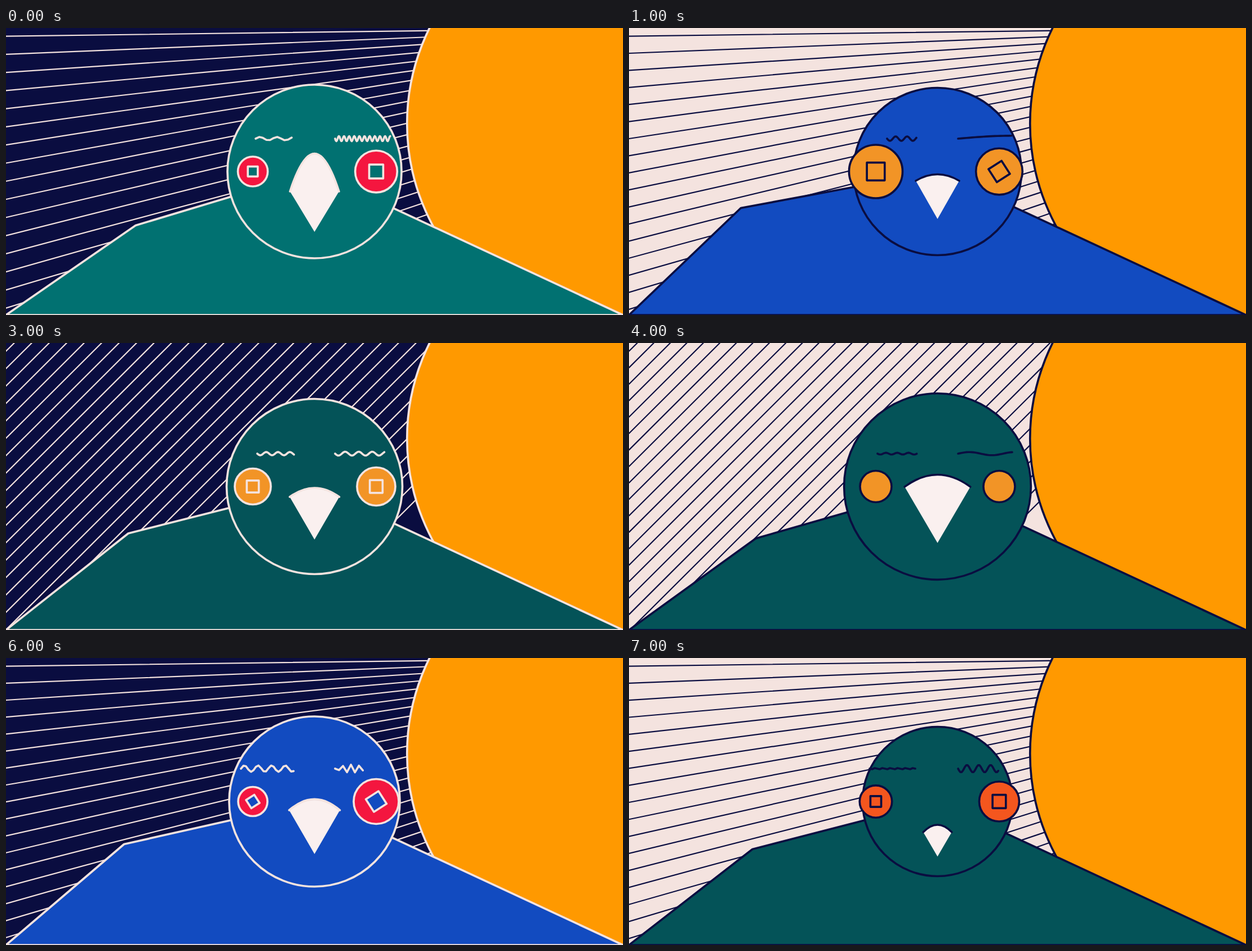
Recreate the animation shown at these times as an HTML page. Size 1095x511 px, loop 8000 ms.

```html
<!DOCTYPE html>
<html lang="en">
<head>
<meta charset="utf-8">
<title>Birds</title>
<style>
  html, body { margin: 0; width: 100%; height: 100%; overflow: hidden; }
  svg { display: block; width: 100%; height: 100%; }
</style>
</head>
<body>
<svg id="stage" viewBox="0 0 1095 511"></svg>
<script>
const W = 1095, H = 511, CX = W / 2, CY = H / 2;
const STEP = 1000, BROW_Y = 197;
const DARK = '#0a0d40', PALE = '#f4e3df', SUN = '#ff9900', BEAK = '#faf0ef';
const TEAL = '#017171', BLUE = '#124bc0', DEEP = '#045358';
const RED = '#f4163f', AMBER = '#f29426', CORAL = '#f4561e';

// eyes: [radius, pupil turn in radians, or null for no pupil]
// beak: [apex y, corner y, half width, top y]
// brows: [start x, end x, amplitude, period, sample step]
const birds = [
  { night: 1, body: TEAL, gap: 32.27, shoulder: [230, 351.5], head: 154.5,
    eye: RED, left: [26.5, 0], right: [37.3, 0], beak: [363, 291, 43.5, 223.5],
    brows: [[443, 507, -3, 30.3, 6.4], [584, 682, 4.5, 9.1, 1.1]] },
  { night: 0, body: BLUE, gap: 30.4, shoulder: [198.5, 320.5], head: 149,
    eye: AMBER, left: [47.5, 0], right: [41.3, 1], beak: [340, 272, 38.5, 260.5],
    brows: [[458, 509, 4, 20.3, 2], [584, 679, -5.2, 380, 5]] },
  { night: 1, body: DEEP, gap: 33.4, shoulder: [209, 330.5], head: 153.5,
    eye: AMBER, left: [34, 0], right: [34, 1], beak: [344, 286, 34, 280],
    brows: [[455, 509, 1.1, 12.5, 4.2], [584, 669, 5.5, 6.2, 1.9]] },
  { night: 1, diagonal: 1, body: DEEP, gap: 31, shoulder: [217, 339], head: 156,
    eye: AMBER, left: [32, 0], right: [34, 0], beak: [350, 274, 44, 258],
    brows: [[446, 510, 3, 21, 2.5], [584, 672, 3.5, 24, 2.5]] },
  { night: 0, diagonal: 1, body: DEEP, gap: 29.3, shoulder: [225, 348], head: 165.8,
    eye: AMBER, left: [28, null], right: [28, null], beak: [356, 256, 58.3, 234.5],
    brows: [[441, 511, 1.6, 20, 2.9], [584, 681, -2.8, 80, 3]] },
  { night: 1, body: TEAL, gap: 31, shoulder: [215, 337], head: 152,
    eye: RED, left: [30, 0], right: [36, 0], beak: [351, 280, 41, 258],
    brows: [[436, 510, 3, 22, 3], [584, 662, 4.5, 18, 2.5]] },
  { night: 1, body: BLUE, gap: 30.2, shoulder: [209.5, 331.5], head: 151.5,
    eye: RED, left: [26, 1], right: [40, 1], beak: [349, 271, 45, 251.5],
    brows: [[417, 511, -5.7, 24.2, 4.45], [584, 634, 7, 16.05, 7.05]] },
  { night: 0, body: DEEP, gap: 30.3, shoulder: [219, 340.5], head: 133,
    eye: CORAL, left: [28.7, 0], right: [35.5, 0], beak: [353.5, 310, 25.3, 297],
    brows: [[427, 508, 1.1, 13.5, 4.5], [584, 656, 6.5, 21, 2.1]] }
];

const circle = (x, y, r, fill) => `<circle cx="${x}" cy="${y}" r="${r}" fill="${fill}"/>`;
const path = (d, fill = 'none', extra = '') => `<path d="${d}" fill="${fill}" ${extra}/>`;

function rays({ gap, diagonal }) {
  let d = '';
  for (let y = W / 75; y < 2 * H; y += gap) d += `M0 ${y}L${diagonal ? y : W + y} 0`;
  return path(d, 'none', 'stroke-width="2.19"');
}

function eye(x, [r, turn], bird) {
  const side = r * 2 / 3;
  const fill = bird.eye === RED ? bird.body : 'none';
  const pupil = turn === null ? '' :
    `<rect x="${-side / 2}" y="${-side / 2}" width="${side}" height="${side}" fill="${fill}"
      transform="translate(${x} ${CY}) rotate(${turn * 180 / Math.PI})"/>`;
  return circle(x, CY, r, bird.eye) + pupil;
}

function beak([apex, corner, half, top]) {
  const l = CX - half, r = CX + half;
  const arc = `M${l} ${corner}Q${CX} ${2 * top - corner} ${r} ${corner}`;
  return path(`${arc}L${CX} ${apex}Z`, BEAK, 'stroke="none"') + path(arc);
}

function brow([from, to, amp, period, step]) {
  const n = Math.round((to - from) / step), points = [];
  for (let i = 0; i <= n; i++) {
    const dx = i * step;
    points.push(`${from + dx} ${BROW_Y + amp * Math.sin(2 * Math.PI * dx / period)}`);
  }
  return path('M' + points.join('L'));
}

function draw(bird) {
  const [ground, ink] = bird.night ? [DARK, PALE] : [PALE, DARK];
  return `<rect width="${W}" height="${H}" fill="${ground}"/>
    <g stroke="${ink}" stroke-width="3.65" stroke-linecap="round" stroke-linejoin="round">
    ${rays(bird)}
    ${circle(W, H / 3, W * 0.35, SUN)}
    ${path(`M0 ${H}L${bird.shoulder.join(' ')}L${CX} ${CY}L${W} ${H}Z`, bird.body)}
    ${circle(CX, CY, bird.head, bird.body)}
    ${eye(W * 0.4, bird.left, bird)}
    ${eye(W * 0.6, bird.right, bird)}
    ${beak(bird.beak)}
    ${bird.brows.map(brow).join('')}
    </g>`;
}

const stage = document.getElementById('stage');
const start = performance.now();
let shown = -1;

function update(now) {
  const index = Math.floor(Math.max(0, now - start) / STEP) % birds.length;
  if (index !== shown) {
    shown = index;
    stage.innerHTML = draw(birds[index]);
  }
  requestAnimationFrame(update);
}
update(start);
</script>
</body>
</html>
```
